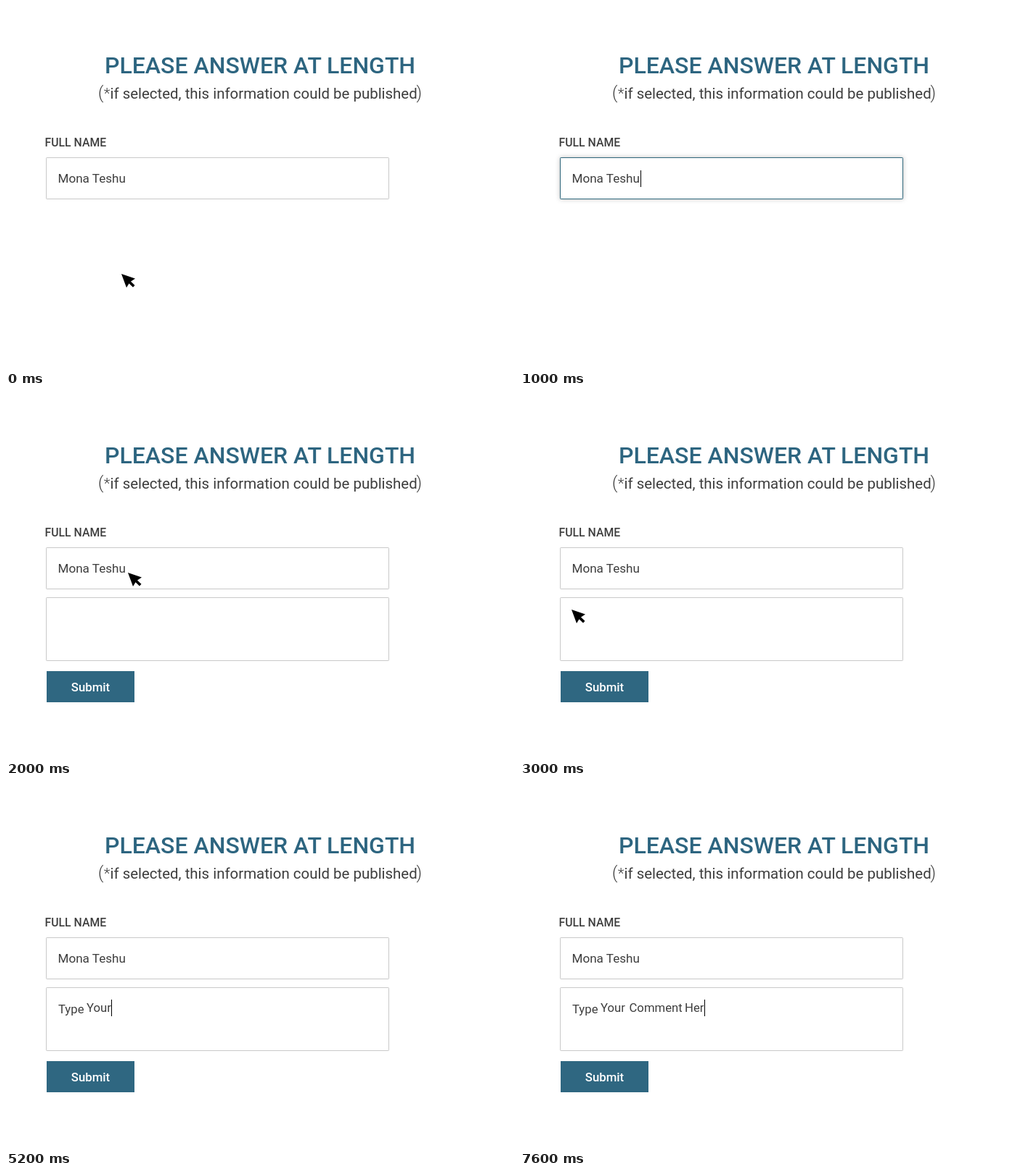
Animation, 700 px wide and 500 px high, one loop 8000 ms. Source, as an HTML page:

```html
<!DOCTYPE html>
<html lang="en">
<head>
<meta charset="utf-8">
<title>Form</title>
<style>
  html, body { margin: 0; width: 100%; height: 100%; overflow: hidden; background: #fff; }
  svg { display: block; width: 700px; height: 500px; }
  text { font-family: Roboto, sans-serif; fill: #3e3e3e; white-space: pre; }
  .title { font-size: 32px; font-weight: 500; fill: #2d6580; text-anchor: middle; }
  .note { font-size: 20.45px; }
  .light { font-weight: 300; }
  .paren { font-size: 23px; }
  .label { font-size: 15.8px; font-weight: 500; }
  .name { font-size: 17.1px; }
  .comment text { font-size: 16.7px; }
  .field { fill: #fff; stroke: #c9c9c9; }
  .focused { stroke: #2f677c; filter: drop-shadow(0 0 3px rgba(0, 0, 0, .25)); }
  .button { fill: #2f6781; }
  .submit { font-size: 16.8px; font-weight: 500; fill: #fff; text-anchor: middle; }
  .caret { fill: #000; }
</style>
</head>
<body>
<svg viewBox="0 0 700 500">
  <text class="title" x="350" y="92.5">PLEASE ANSWER AT LENGTH</text>
  <text class="paren light" x="127" y="128">(</text>
  <text class="note" x="134.8" y="128"><tspan class="light">*</tspan>if selected, this information could be published</text>
  <text class="paren light" x="565.5" y="128">)</text>
  <text class="label" x="53.5" y="194">FULL NAME</text>

  <rect id="nameField" class="field" x="55.5" y="209.5" width="472" height="57" rx=".7"/>
  <text class="name" x="71.5" y="244">Mona Teshu</text>
  <rect id="nameCaret" class="caret" x="166" y="227" width="1" height="23"/>

  <rect id="commentField" class="field" x="55.5" y="278.5" width="472" height="87" rx=".7"/>
  <g id="comment" class="comment"></g>
  <rect id="commentCaret" class="caret" y="295" width="1" height="23"/>

  <g id="submit">
    <rect class="button" x="56" y="380" width="121" height="43"/>
    <text class="submit" x="116.5" y="408">Submit</text>
  </g>
  <path id="pointer" d="M0 0 19 6.5 13 10.5 18.5 15.8 16 18.5 10.5 13.2 7 19Z"/>
</svg>
<script>
const STEP = 200, LOOP = 8000, LAST_STEP = 38;
const $ = id => document.getElementById(id);
const show = (id, on) => $(id).setAttribute('visibility', on ? 'visible' : 'hidden');
const between = (n, from, to) => n >= from && n <= to;

// Pointer position by step; it is hidden on all other steps.
const pointerPath = {
  0: [159, 370], 1: [161, 335], 2: [164, 292], 3: [168, 244],
  8: [168, 244], 9: [168, 244], 10: [168, 244], 11: [162, 266],
  12: [148, 284], 13: [122, 304], 14: [95, 303], 15: [71, 295]
};

// Each word types one letter per step from its start.
const words = [
  { text: 'Type', start: 18, x: 72, y: 314 },
  { text: 'Your', start: 23, x: 111, y: 312 },
  { text: 'Comment', start: 29, x: 150.5, y: 312 },
  { text: 'Her', start: 36, x: 227, y: 312 }
];
for (const word of words) {
  word.node = document.createElementNS('http://www.w3.org/2000/svg', 'text');
  word.node.setAttribute('x', word.x);
  word.node.setAttribute('y', word.y);
  $('comment').append(word.node);
}

function typeComment(step) {
  let caretX = 72;
  for (const { text, start, x, node } of words) {
    node.textContent = text.slice(0, Math.max(0, step - start + 1));
    if (node.textContent) caretX = Math.ceil(x + node.getComputedTextLength());
  }
  if (step === 22) caretX = 110;
  if (step === 28) caretX = 150;
  $('commentCaret').setAttribute('x', caretX);
  show('commentCaret', step >= 16 && step !== 17 && step !== 27);
}

function draw(step) {
  $('nameField').classList.toggle('focused', between(step, 4, 7));
  show('nameCaret', step === 5 || step === 7);
  show('commentField', step >= 9);
  show('submit', step >= 10);
  typeComment(step);

  const at = pointerPath[step];
  show('pointer', at);
  if (at) $('pointer').setAttribute('transform', `translate(${at})`);
}

let drawn = -1;
const begin = performance.now();
function tick() {
  const time = (performance.now() - begin) % LOOP;
  const step = Math.min(LAST_STEP, Math.floor(time / STEP));
  if (step !== drawn) draw(drawn = step);
  requestAnimationFrame(tick);
}
tick();
</script>
</body>
</html>
```
